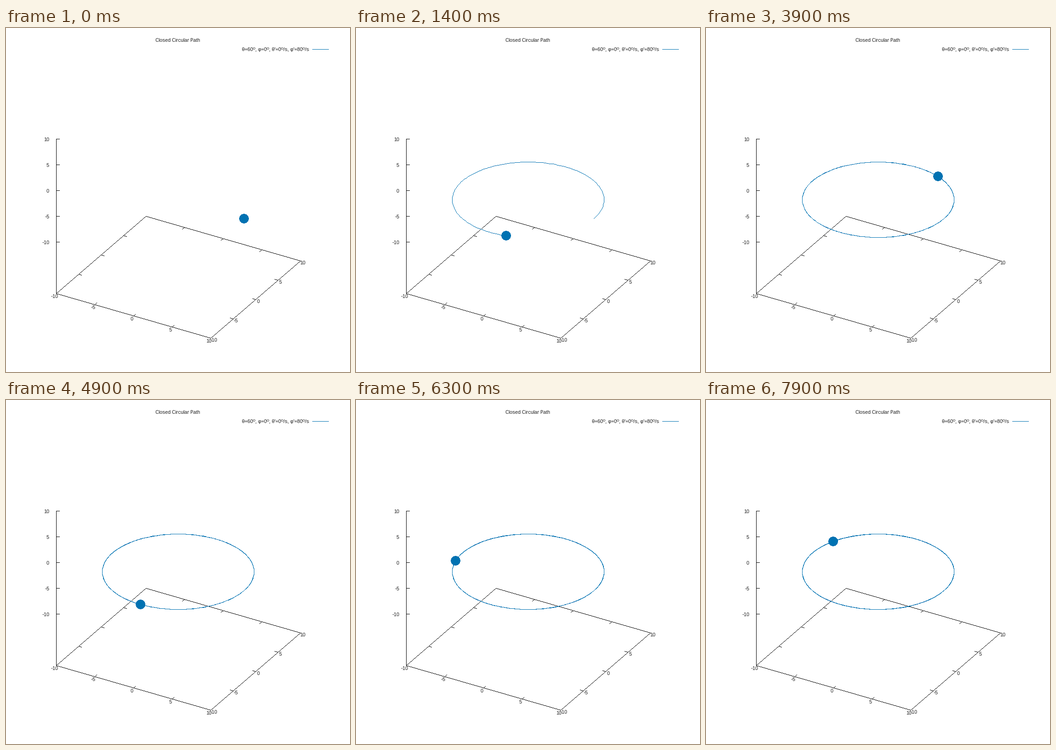
A matplotlib script for the animation above (8 s loop, 748 by 748 pixels).

```python
import numpy as np
import matplotlib.pyplot as plt
from matplotlib.animation import FuncAnimation

SIZE, DPI = 748, 100
FRAMES, INTERVAL = 80, 100
BLUE, INK = (0, 114, 178), (0, 0, 0)
BALL_R = 10.3

plt.rcParams.update({
    "font.family": "Liberation Sans",
    "font.size": 11 * 72 / DPI,
    "text.hinting": "native",
    "text.hinting_factor": 1,
})

fig = plt.figure(figsize=(SIZE / DPI, SIZE / DPI), dpi=DPI, facecolor="white")
ax = fig.add_axes([0, 0, 1, 1])
ax.axis("off")


def stroke(img, points, color=INK):
    """Draw a hard-edged line, one pixel wide, through the points."""
    pts = np.floor(np.asarray(points, float) + 0.5)
    for a, b in zip(pts, pts[1:]):
        n = int(abs(b - a).max()) + 1
        x, y = np.floor(np.linspace(a, b, n) + 0.5).astype(int).T
        img[y, x] = color


def disc(img, x, y, r, color):
    dy, dx = np.mgrid[-11:12, -11:12]
    inside = dx**2 + dy**2 <= r**2
    img[dy[inside] + int(y), dx[inside] + int(x)] = color


def label(x, y, text, ha="center"):
    ax.text(x, np.floor(y + 0.5) + 3.5, text, ha=ha, va="baseline",
            color="#202020")


base = np.full((SIZE, SIZE, 3), 255, np.uint8)

# Base plane: corner plus the projected x and y edges
corner = np.array([109, 577])
ex, ey = np.array([336, 97]), np.array([194.5, -168])
right, back, far = corner + ex, corner + ey, corner + ex + ey
stroke(base, [corner, right, far, back, corner])
stroke(base, [(109, 241), corner])

tick_x, tick_y = 0.02 * ex, 0.023 * ey
for i, value in enumerate(range(-10, 11, 5)):
    f = i / 4
    px, py = corner + f * ex, right + f * ey
    label(px[0] - 4, px[1] + 6, str(value))
    label(py[0] + 5.5, py[1] + 4, str(value))
    z = 465 - 56 * i
    stroke(base, [(109, z), (116, z)])
    label(93.5, z + 1, str(value), "right")
    if 0 < i < 4:
        stroke(base, [px, px + tick_y])
        stroke(base, [px + ey, px + ey - tick_y])
        stroke(base, [py, py - tick_x])
        stroke(base, [py - ex, py - ex + tick_x])

label(373, 26, "Closed Circular Path")
label(658.5, 46, "θ=60º, φ=0º, θ'=0º/s, φ'=80º/s", "right")
stroke(base, [(666, 46), (701, 46)], BLUE)

screen = ax.imshow(base, extent=(-0.5, SIZE - 0.5, SIZE - 0.5, -0.5),
                   interpolation="nearest", aspect="auto")


def orbit(t):
    a = np.radians(-30 + 202.1 * t)
    return np.stack([374 + 165 * np.cos(a), 373 - 82 * np.sin(a)], axis=-1)


def update(i):
    # Ten trail samples per frame
    path = orbit(np.arange(i * 10 + 1) / 100)
    img = base.copy()
    stroke(img, path, BLUE)
    disc(img, *np.floor(path[-1] + 0.5), BALL_R, BLUE)
    screen.set_data(img)
    return screen,


anim = FuncAnimation(fig, update, frames=FRAMES, interval=INTERVAL,
                     repeat=True, repeat_delay=0)
plt.show()
```
